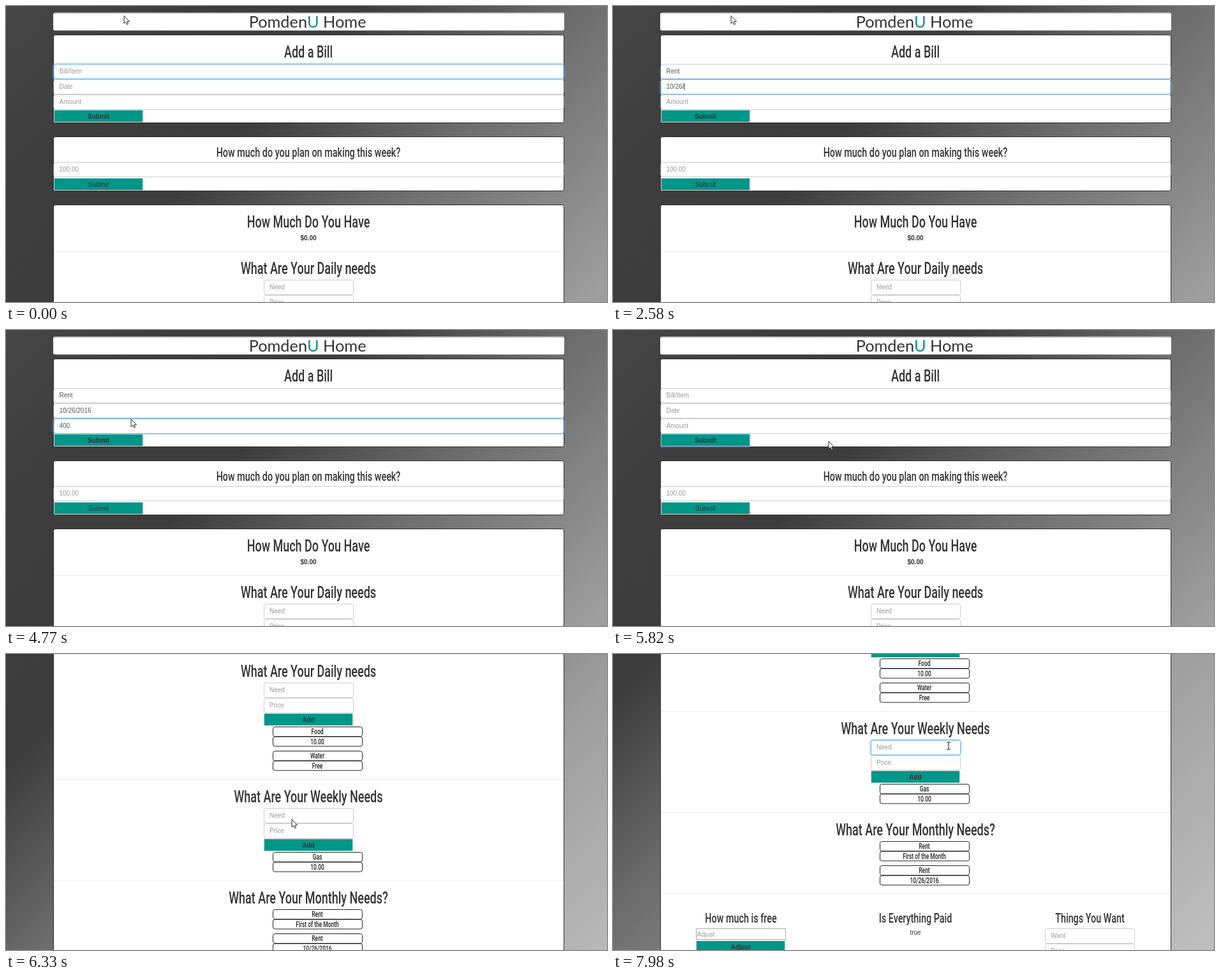
These frames come from a looping animation (942 px wide and 465 px high, 8000 ms). An HTML page:

```html
<!DOCTYPE html>
<html lang="en">
<head>
<meta charset="utf-8">
<title>Household budget</title>
<style>
  html, body { margin: 0; width: 100%; height: 100%; overflow: hidden; background: #3c3c3c; }
  svg { display: block; width: 100%; height: 100%; }
  text { font: 10px "Liberation Sans", Arial, sans-serif; fill: #333; white-space: pre; }
  .brand { font: 25.3px Lato, sans-serif; }
  .brand tspan { fill: #138f84; }
  .head { font: 500 25.5px Roboto, sans-serif; }
  .sub { font: 500 20.4px Roboto, sans-serif; }
  .item { font: 500 12px Roboto, sans-serif; fill: #222; }
  .bold { font-weight: 700; }
  .plain { font-size: 10.4px; }
  .mid { text-anchor: middle; }
  .value { fill: #555; }
  .value.empty { fill: #999; }
  .card { fill: #fff; stroke: #2e2e2e; }
  .field { fill: #fff; stroke: #ccc; }
  .square { stroke: #a9a9a9; }
  .button { fill: #009688; stroke: #d5dddc; }
  .row { fill: #fff; stroke: #222; }
  .rule { stroke: #eaeaea; }
  .glow { fill: none; stroke: #66afe9; stroke-opacity: .3; stroke-width: 3; visibility: hidden; }
  .focus .glow { visibility: visible; }
  .focus .field { stroke: #66afe9; }
  .focus .button { stroke: #a9cdee; }
  .pointer { fill: #fff; stroke: #111; stroke-width: .9; stroke-linejoin: round; }
</style>
</head>
<body>
<svg viewBox="0 0 942 465" preserveAspectRatio="none">
  <defs>
    <linearGradient id="shade" gradientUnits="userSpaceOnUse" x1="0" y1="0" x2="1000" y2="1000">
      <stop offset="0" stop-color="#464646"/>
      <stop offset=".15" stop-color="#3d3d3d"/>
      <stop offset=".28" stop-color="#3c3c3c"/>
      <stop offset=".45" stop-color="#6c6c6c"/>
      <stop offset=".69" stop-color="#9e9e9e"/>
      <stop offset=".93" stop-color="#bdbdbd"/>
    </linearGradient>
  </defs>
  <g id="page"></g>
  <line id="caret" y1="-9" y2="2" stroke="#333"/>
  <g id="pointers">
    <path id="arrow" class="pointer" d="M0 0V12L2.8 9.5L4.7 13.7L6.6 12.8L4.8 8.8H8.6Z"/>
    <path id="hand" class="pointer" d="M-1.4 9V1Q-1.4 -.5 0 -.5T1.3 1V5Q3 4.2 3.6 5.6Q5 5 5.4 6.3Q7 6 7 7.6V11L5.6 15H-1.6L-5 9.6Q-5.4 7.6 -3.6 7.9Z"/>
    <path id="beam" fill="none" stroke="#333" stroke-width="1.2" d="M-3 -5.5H-1L0 -4.5L1 -5.5H3M0 -4.5V5M-3 6H-1L0 5L1 6H3"/>
  </g>
</svg>
<script>
const $ = id => document.getElementById(id);
const page = $('page'), caret = $('caret');
const MID = 474, CONDENSED = .705;

const rect = (cls, x, y, w, h, r = 3) =>
  `<rect class="${cls}" x="${x + .5}" y="${y + .5}" width="${w}" height="${h}" rx="${r}"/>`;
const label = (cls, x, y, str) => `<text class="${cls}" x="${x}" y="${y}">${str}</text>`;
const condensed = (cls, x, y, str) =>
  `<text class="mid ${cls}" transform="translate(${x} ${y}) scale(${CONDENSED} 1)">${str}</text>`;
const rule = y => `<path class="rule" d="M75 ${y + .5}H874"/>`;

const field = (id, x, y, w, hint) => `<g id="${id}">${rect('glow', x - 1, y - 1, w + 2, 25, 4)}
  ${rect('field', x, y, w, 23)}${label('value empty', x + 9, y + 15, hint)}</g>`;
const button = (id, x, y, str, cls = 'bold') => `<g id="${id}">${rect('glow', x, y, 139, 20, 1)}
  ${rect('button', x, y, 139, 19, 1)}${label('mid ' + cls, x + 70, y + 13.5, str)}</g>`;
const item = (y, str) => rect('row', 418, y, 140, 15) + condensed('item', 488, y + 12.3, str);
const pair = (y, a, b) => item(y, a) + item(y + 15.5, b);
const needForm = (id, y) => field(id, 404, y, 140, 'Need') +
  field(id + 'Price', 404, y + 24, 140, 'Price') + button(id + 'Add', 404, y + 48, 'Add');

page.innerHTML = [
  '<rect width="942" height="1100" fill="url(#shade)"/>',
  '<rect x="74" y="10.5" width="801" height="28" rx="3" fill="#fff"/>',
  '<path d="M76 11.5H873" stroke="#c4c4c4"/>',
  '<text class="brand" x="472" y="34" text-anchor="end">Pomden</text>',
  '<text class="brand" x="472" y="34"><tspan>U</tspan> Home</text>',

  rect('card', 74, 45, 800, 138),
  condensed('head', MID, 81, 'Add a Bill'),
  field('bill', 74.5, 91, 799, 'Bill/Item'),
  field('date', 74.5, 115, 799, 'Date'),
  field('amount', 74.5, 139, 799, 'Amount'),
  button('submit', 75, 163, 'Submit'),

  rect('card', 74, 205, 800, 85),
  condensed('sub', MID, 237, 'How much do you plan on making this week?'),
  field('income', 74.5, 245, 799, '100.00'),
  button('plan', 75, 270, 'Submit', 'plain'),

  rect('card', 74, 312, 800, 900),
  condensed('head', MID, 348, 'How Much Do You Have'),
  label('mid bold', MID, 367.5, '$0.00'),
  rule(385),
  condensed('head', MID, 421, 'What Are Your Daily needs'),
  needForm('daily', 430),
  pair(499, 'Food', '10.00'),
  pair(537, 'Water', 'Free'),
  rule(582),
  condensed('head', MID, 618, 'What Are Your Weekly Needs'),
  needForm('weekly', 627),
  pair(696, 'Gas', '10.00'),
  rule(741),
  condensed('head', MID, 777, 'What Are Your Monthly Needs?'),
  pair(786, 'Rent', 'First of the Month'),
  pair(824, 'Rent', '10/26/2016'),
  rule(868),
  condensed('sub', 200.5, 914, 'How much is free'),
  rect('field square', 130, 923, 140, 17, 0),
  label('value empty', 131.5, 935.5, 'Adjust'),
  button('adjust', 130, 942, 'Adjust'),
  condensed('sub', MID, 914, 'Is Everything Paid'),
  label('mid', MID, 933, 'true'),
  condensed('sub', 747.5, 914, 'Things You Want'),
  field('want', 677, 923, 140, 'Want'),
  field('wantPrice', 677, 947, 140, 'Price')
].join('');

const LOOP = 8000;
const at = (x, y, pointer = 'arrow') => ({ x, y, pointer });

// Each step changes part of the state at its time in ms.
const steps = [
  [0, { ...at(185, 15.5), scroll: 0, focus: 'bill', caret: false, bill: '', date: '', amount: '' }],
  [420, { bill: 'R', caret: true }],
  [600, { bill: 'Ren' }],
  [780, { bill: 'Rent' }],
  [1140, { focus: 'date', caret: false }],
  [1380, { caret: true }],
  [1620, { date: '1' }],
  [1800, { date: '10' }],
  [1980, { date: '10/' }],
  [2190, { date: '10/2' }],
  [2370, { date: '10/26' }],
  [2580, { date: '10/26/' }],
  [2760, { date: '10/26/2' }],
  [2940, { date: '10/26/201' }],
  [3150, { date: '10/26/2016' }],
  [3330, { focus: 'amount' }],
  [3570, { caret: false }],
  [3750, { amount: '4', caret: true }],
  [3930, { amount: '40' }],
  [4110, { amount: '400' }],
  [4290, { caret: false }],
  [4500, at(222, 86)],
  [4770, at(196, 140)],
  [4980, at(176, 170, 'hand')],
  [5190, at(172, 172, 'hand')],
  [5490, { focus: 'submit', bill: '', date: '', amount: '' }],
  [5820, at(338, 175)],
  [6120, { ...at(443, 205, 'hand'), scroll: 277 }],
  [6330, { ...at(448, 260), scroll: 385 }],
  [6540, { ...at(452, 310), scroll: 460 }],
  [6750, { ...at(452, 320), scroll: 492 }],
  [7320, at(290, 405)],
  [7500, at(152, 425)],
  [7650, at(470, 442)],
  [7800, at(788, 400)],
  [7980, { ...at(526, 144, 'beam'), focus: 'weekly' }]
];

const inputs = ['bill', 'date', 'amount'].map(id => {
  const text = $(id).querySelector('text');
  return { id, text, hint: text.textContent };
});
const focusable = ['bill', 'date', 'amount', 'submit', 'weekly'];

function draw(now) {
  const time = now % LOOP;
  const state = Object.assign({}, ...steps.filter(s => s[0] <= time).map(s => s[1]));

  page.setAttribute('transform', `translate(0 ${-state.scroll})`);
  for (const id of focusable) $(id).classList.toggle('focus', id === state.focus);

  caret.style.visibility = 'hidden';
  for (const { id, text, hint } of inputs) {
    const value = state[id];
    text.textContent = value || hint;
    text.classList.toggle('empty', !value);
    if (state.caret && id === state.focus) {
      const x = +text.getAttribute('x') + .5 + (value ? text.getComputedTextLength() : 0);
      caret.setAttribute('transform', `translate(${x} ${text.getAttribute('y')})`);
      caret.style.visibility = 'visible';
    }
  }

  $('pointers').setAttribute('transform', `translate(${state.x} ${state.y})`);
  for (const p of $('pointers').children) p.style.display = p.id === state.pointer ? '' : 'none';
}

const start = performance.now();
(function tick() {
  draw(performance.now() - start);
  requestAnimationFrame(tick);
})();
</script>
</body>
</html>
```
